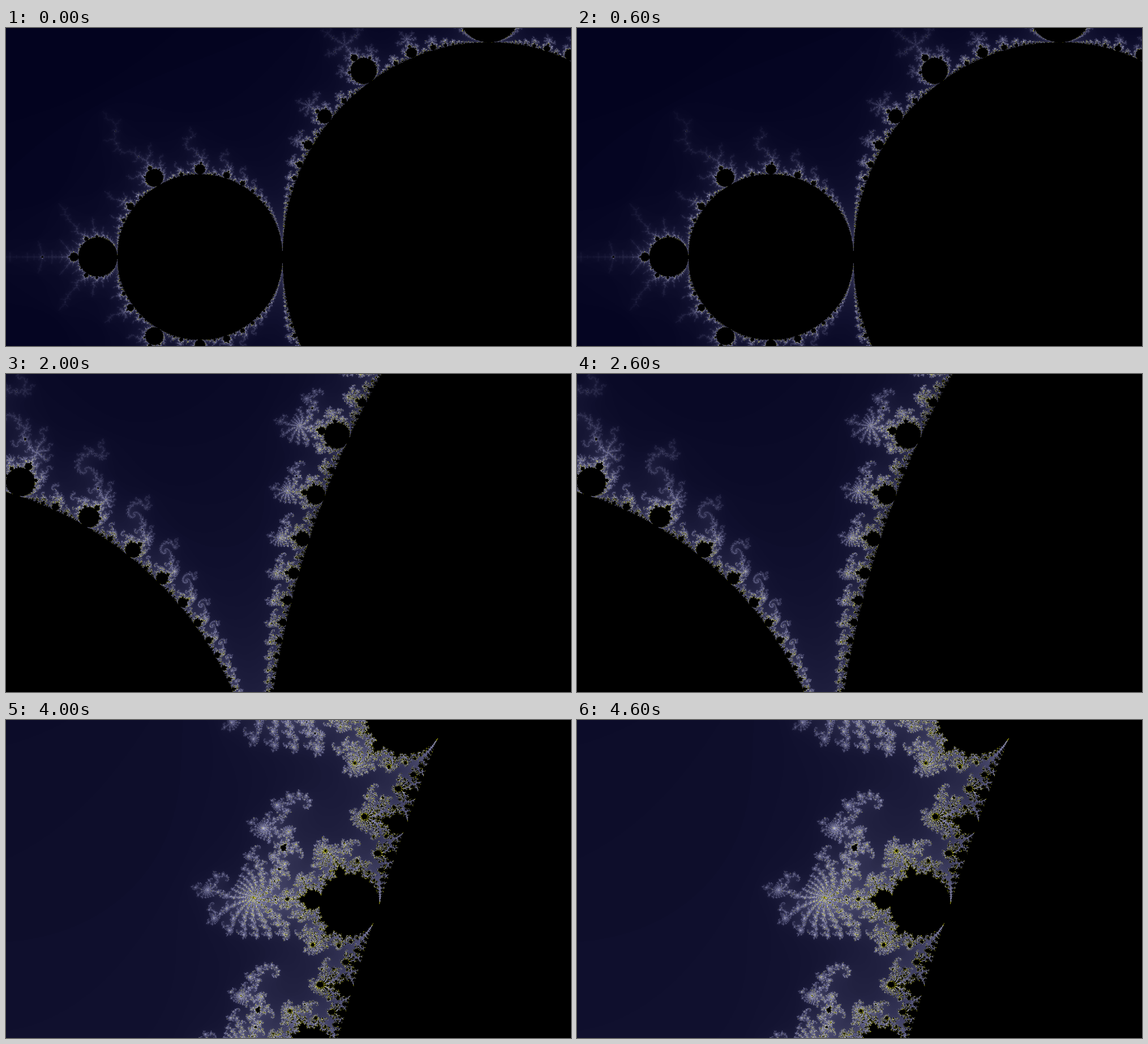
Recreate the animation shown at these times as an HTML page with a canvas. Size 998 by 561 pixels, loop 5 s.

```html
<!DOCTYPE html>
<html lang="en">
<head>
<meta charset="utf-8">
<title>Fractal zoom</title>
<style>
  html, body { margin: 0; width: 100%; height: 100%; overflow: hidden; background: #000; }
  canvas { display: block; }
</style>
</head>
<body>
<canvas id="stage" width="998" height="561"></canvas>
<script>
const STEPS = 5;
const STEP_MS = 1000;
const MAX_ITER = 256;
const CENTER = { re: -0.7318, im: 0.2113 };
const START_SPAN = 2 / 1.05 ** 15;   // height of the first view
const ZOOM_PER_STEP = 1.05 ** 15;
const FINE = { width: 1920, height: 1080 };

function makeCanvas(width, height) {
  return Object.assign(document.createElement('canvas'), { width, height });
}

const stage = document.getElementById('stage');
const stageCtx = stage.getContext('2d');
const fine = makeCanvas(FINE.width, FINE.height);
const fineCtx = fine.getContext('2d');

function inMainBody(re, im) {
  const im2 = im * im;
  const x = re - 0.25;
  const q = x * x + im2;
  return q * (q + x) <= 0.25 * im2 || (re + 1) ** 2 + im2 <= 0.0625;
}

function escapeTime(re, im) {
  if (inMainBody(re, im)) return MAX_ITER;
  let x = 0, y = 0, x2 = 0, y2 = 0, n = 0;
  while (n < MAX_ITER && x2 + y2 <= 4) {
    y = 2 * x * y + im;
    x = x2 - y2 + re;
    x2 = x * x;
    y2 = y * y;
    n++;
  }
  return n;
}

// Packed ABGR: grey rises with n, while blue runs ahead and wraps to yellow.
const palette = Uint32Array.from({ length: MAX_ITER + 1 }, (_, n) => {
  if (n === MAX_ITER) return 0xff000000;
  const blue = Math.round(28 + 1.1 * n) & 255;
  return (255 << 24 | blue << 16 | n << 8 | n) >>> 0;
});

// Computes a view at high resolution and scales it down to soften the detail.
function renderView(step) {
  const { width, height } = FINE;
  const unit = START_SPAN / ZOOM_PER_STEP ** step / height;
  const image = fineCtx.createImageData(width, height);
  const pixels = new Uint32Array(image.data.buffer);
  for (let row = 0; row < height; row++) {
    const im = CENTER.im - (row - height / 2) * unit;
    for (let col = 0; col < width; col++) {
      const re = CENTER.re + (col - width / 2) * unit;
      pixels[row * width + col] = palette[escapeTime(re, im)];
    }
  }
  fineCtx.putImageData(image, 0, 0);

  const view = makeCanvas(stage.width, stage.height);
  const ctx = view.getContext('2d');
  ctx.imageSmoothingQuality = 'high';
  ctx.drawImage(fine, 0, 0, view.width, view.height);
  return view;
}

const views = Array.from({ length: STEPS }, (_, step) => renderView(step));
let shown = -1;

function draw(ms) {
  const step = Math.floor(ms / STEP_MS) % STEPS;
  if (step !== shown) {
    stageCtx.drawImage(views[step], 0, 0);
    shown = step;
  }
}

function tick() {
  draw(performance.now() - start);
  requestAnimationFrame(tick);
}

const start = performance.now();
tick();
</script>
</body>
</html>
```
